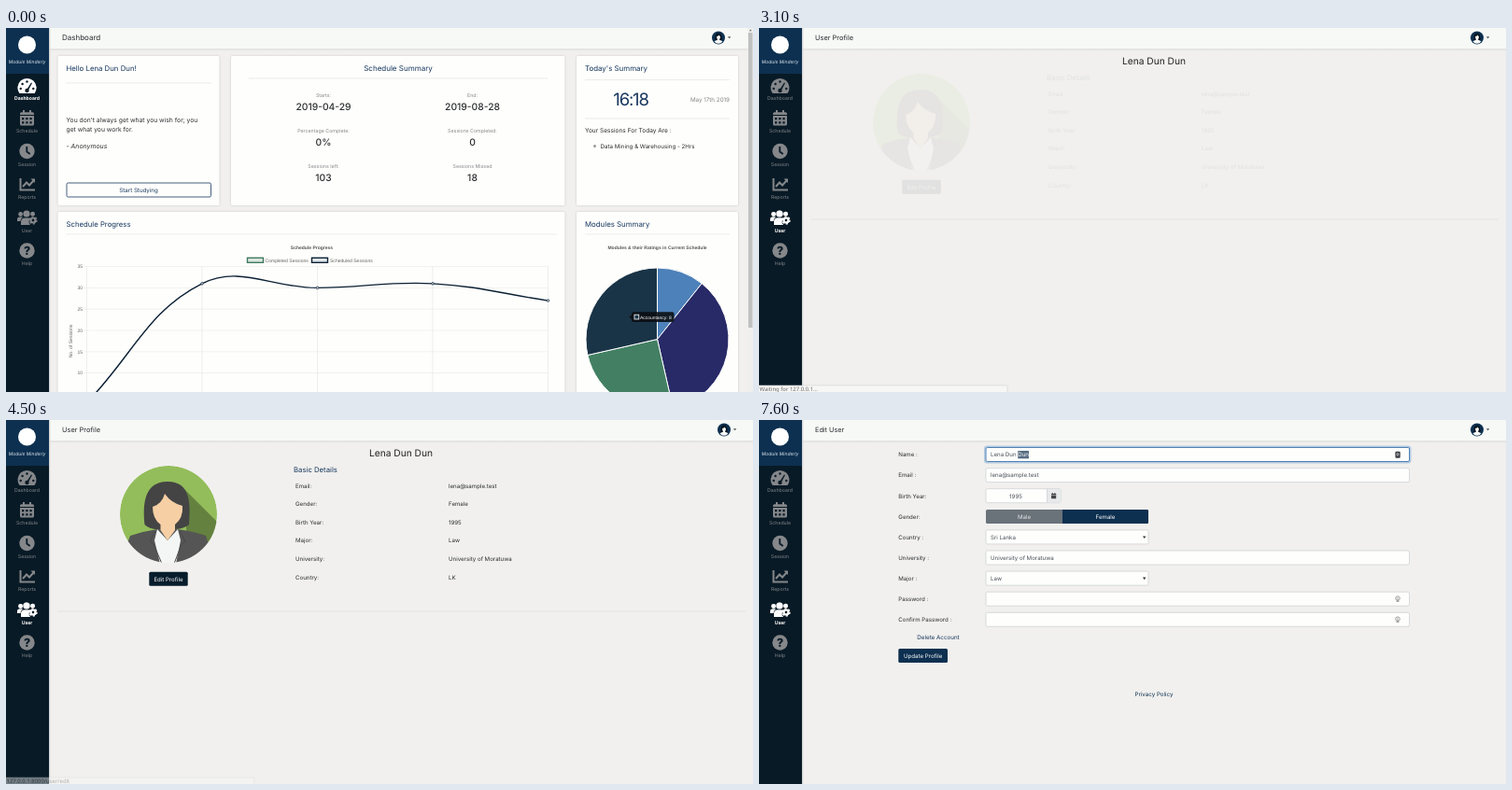
Write an HTML page that moves like this. It is 800 px wide and 390 px high and loops after 8 s.

```html
<!DOCTYPE html>
<html lang="en">
<head>
<meta charset="utf-8">
<title>Study dashboard</title>
<style>
html, body { margin: 0; width: 100%; height: 100%; overflow: hidden; background: #f1f0ee; }
svg { display: block; width: 100%; height: 100%; }
text { font-family: Inter, "Open Sans", sans-serif; text-rendering: geometricPrecision; white-space: pre; }
.chart text { font-family: "Liberation Sans", Arial, sans-serif; }
.status text { font-family: "Noto Sans", "Open Sans", sans-serif; }
.card { fill: #fefefc; filter: drop-shadow(0 .5px 1px rgba(0, 0, 0, .17)); }
.fade { animation: fade 8s infinite; }
.edit-link { animation: edit-link 8s linear infinite; }
.pressed { animation: pressed 8s linear infinite; }
.focus { animation: focus 8s linear infinite; }
@keyframes fade {
  0%, 37.7% { opacity: 0; animation-timing-function: ease; }
  50.2%, 100% { opacity: 1; }
}
@keyframes edit-link {
  0%, 55% { opacity: 0; }
  56.25%, 60% { opacity: .45; }
  63.75%, 69.99% { opacity: .85; }
  70%, 100% { opacity: 0; }
}
@keyframes pressed {
  0%, 59% { opacity: 0; }
  63.75%, 100% { opacity: 1; }
}
@keyframes focus {
  0%, 74% { opacity: 0; }
  76.25%, 100% { opacity: 1; }
}
</style>
</head>
<body>
<script>
const LOOP = 8000;
const NAVY = '#17375e', DARK = '#081a26', BLUE = '#0d3050', INK = '#2b2d30', MUTED = '#85878a';
const USER = 'Lena Dun Dun', EMAIL = 'lena@sample.test';
let keyframes = '', clock = 0;

// Shows content only within the given [from, to] ranges of the loop, in ms.
function during(content, ...ranges) {
  const name = 'show' + clock++;
  const at = (ms, value) => `${ms / LOOP * 100}%{opacity:${value}}`;
  keyframes += `@keyframes ${name}{0%{opacity:0}${ranges.map(([a, b]) => at(a, 1) + at(b, 0)).join('')}}`;
  return `<g style="animation:${name} ${LOOP}ms step-end infinite">${content}</g>`;
}
const text = (x, y, value, size = 6.15, fill = INK, attrs = '') =>
  `<text x="${x}" y="${y}" font-size="${size}" fill="${fill}" ${attrs}>${value.replace('&', '&amp;')}</text>`;
const centered = (x, y, value, size, fill, attrs = '') =>
  text(x, y, value, size, fill, 'text-anchor="middle" ' + attrs);
const rect = (x, y, w, h, fill, attrs = '') =>
  `<rect x="${x}" y="${y}" width="${w}" height="${h}" fill="${fill}" ${attrs}/>`;
const circle = (x, y, r, attrs = '') => `<circle cx="${x}" cy="${y}" r="${r}" ${attrs}/>`;
const path = (d, attrs = '') => `<path d="${d}" ${attrs}/>`;
const rule = (x1, x2, y) => path(`M${x1} ${y}H${x2}`, 'stroke="#e4e4e2" stroke-width=".7"');

// Sidebar
const icons = {
  Dashboard: path('M14.5 70a10 10 0 1 1 16 0z') +
    `<g fill="${DARK}">${[[15.7, 65], [17.6, 60], [22.5, 57.5], [29.3, 65]].map(([x, y]) => circle(x, y, 1.2)).join('')}` +
    circle(22.5, 67, 2.2) + path('M21.8 66.5L27 58.5L28 59L23.8 67z') + '</g>',
  Schedule: path('M18 88h2v2.2h5V88h2v2.2h1.5q1.5 0 1.5 1.5V93H15v-1.3q0-1.5 1.5-1.5H18z') +
    path('M15 94h15v9q0 1.6-1.5 1.6h-12Q15 104.600 15 103z') +
    `<g fill="${DARK}">${[0, 1, 2, 3, 4, 5].map(i => rect(17 + i % 3 * 4.2, 96 + (i > 2) * 4.2, 2.3, 2.3, DARK)).join('')}</g>`,
  Session: circle(22.5, 132, 8.2) + path('M22.300 127v5.500l3.400 2.500', `fill="none" stroke="${DARK}" stroke-width="1.800"`),
  Reports: path('M15.500 161v12.500h15.500', 'fill="none" stroke="currentColor" stroke-width="2"') +
    path('M18 170l4-4.500 3 3 4.500-5', 'fill="none" stroke="currentColor" stroke-width="2"') + path('M26.500 161.500h4.500v4.500z'),
  User: circle(15.6, 199.5, 2.4) + circle(28.6, 199.2, 2.4) + circle(22, 199, 3.6) +
    path('M12 207v-2q0-2.500 2.500-2.500h3.500q-2.500 2-2.500 4.500z') +
    path('M16 211v-3q0-4.500 4-4.500h4q1.500 0 2 1-3 3.500 0 6.500z') +
    circle(29, 206, 2.5, 'fill="none" stroke="currentColor" stroke-width="2.200"') +
    circle(29, 206, 4, 'fill="none" stroke="currentColor" stroke-width="1.200" stroke-dasharray="2.100 2.090"'),
  Help: circle(22.5, 238.5, 8.2) +
    centered(22.5, 243, '?', 12.5, DARK, 'font-weight="800"')
};
const names = Object.keys(icons);
function navItem(name, active) {
  const color = active ? '#fff' : MUTED;
  const label = centered(22.5, 77 + names.indexOf(name) * 35.4, name, active ? 5.1 : 5.2, color, active ? 'font-weight="600"' : '');
  return `<g fill="${color}" color="${color}">${icons[name]}${label}</g>`;
}
const sidebar = rect(0, 0, 46, 390, DARK) + rect(0, 0, 46, 49, BLUE) +
  rect(46, 0, 2.5, 390, 'url(#side)') + circle(22.5, 18, 9.5, 'fill="#fff"') +
  during(
    centered(22.5, 38, 'Module Minderly', 5, '#dde5ec', 'font-style="italic"') +
    names.map(n => navItem(n)).join('') +
    during(navItem('Dashboard', true), [0, 3100]) +
    during(navItem('User', true), [1400, LOOP]),
    [0, 5400], [5500, LOOP]);

// Header
const account = circle(0, 0, 7, `fill="${BLUE}"`) +
  path('M-3.500 3Q-4-5 0-5T3.500 3z', 'fill="#07131d"') +
  path('M-1.900-1.500Q0-2 .800-3 1.500-1.500 2-1.300 2 1.200.900 2L4.500 3.800Q3 6.300 0 6.300T-4.500 3.800L-.900 2Q-2 1-1.900-1.500z', 'fill="#f5f8f6"') +
  path('M9.800-1.200h3.600l-1.800 1.900z', 'fill="#555"');
const header = rect(46, 0, 754, 22.5, '#f6f9f6') + rect(46, 22.5, 754, 2.5, 'url(#under)') +
  during(`<g transform="translate(763 10.500)">${account}</g>`, [0, 3100]) +
  during(`<g transform="translate(769 10.500)">${account}</g>`, [3100, LOOP]);

// Dashboard
const card = (x, y, w, h) => rect(x, y, w, h, '#fefefc', 'rx="1.500" class="card"');
const summary = [
  ['Starts:', '2019-04-29', 'End:', '2019-08-28'],
  ['Percentage Complete:', '0%', 'Sessions Completed:', '0'],
  ['Sessions left:', '103', 'Sessions Missed', '18']
].map((row, i) => row.map((value, j) => {
  const x = j < 2 ? 340 : 499.5, y = 73.5 + i * 38;
  return j % 2 ? centered(x, y + 14, value, 10.3, INK, 'font-weight="500"') : centered(x, y, value, 5.3, MUTED);
}).join('')).join('');

const gridX = [0, 1, 2, 3, 4].map(i => 86.5 + i * 123.5);
const valueY = v => 255.6 + (35 - v) * 4.56;
function lineChart() {
  const pts = [3, 31, 30, 31, 27].map((v, i) => [gridX[i], valueY(v)]);
  const dist = (a, b) => Math.hypot(a[0] - b[0], a[1] - b[1]);
  const handles = pts.map((p, i) => {
    const a = pts[i - 1] || p, b = pts[i + 1] || p, da = dist(a, p), db = dist(p, b);
    const move = k => p.map((v, n) => v + .4 * k / (da + db) * (b[n] - a[n]));
    return [move(-da), move(db)];
  });
  const curve = pts.map((p, i) => i ? `C${handles[i - 1][1]} ${handles[i][0]} ${p}` : `M${p}`).join('');
  const ticks = [35, 30, 25, 20, 15, 10].map(v =>
    path(`M83 ${valueY(v)}H580.500`, 'stroke="#e7e7e5" stroke-width=".6"') +
    text(82, valueY(v) + 1.8, '' + v, 5, '#666', 'text-anchor="end"')).join('');
  return ticks + gridX.map(x => path(`M${x} 255.600V390`, 'stroke="#e3e3e1" stroke-width=".6"')).join('') +
    path(curve, 'fill="none" stroke="#0b2034" stroke-width="1.400"') +
    pts.map(([x, y]) => circle(x, y, 1.3, 'fill="#cfd6dc" stroke="#0b2034" stroke-width=".7"')).join('') +
    centered(327.5, 237, 'Schedule Progress', 5, '#555', 'font-weight="700"') +
    rect(258.5, 246.3, 17, 5, '#dce6e0', 'stroke="#3d7a5f" stroke-width="1.400"') +
    text(277.5, 250.7, 'Completed Sessions', 5.05, '#666') +
    rect(327.5, 246.3, 17, 5, '#dfe4e8', 'stroke="#0b2034" stroke-width="1.400"') +
    text(347, 250.7, 'Scheduled Sessions', 5.05, '#666') +
    centered(0, 0, 'No. of Sessions', 5.1, '#666', 'transform="translate(71 335.500) rotate(-90)"');
}
function pieChart() {
  let sum = 0;
  const rim = n => {
    const a = n / 28 * 2 * Math.PI;
    return `${697.5 + 76.5 * Math.sin(a)} ${333.5 - 76.5 * Math.cos(a)}`;
  };
  const slices = [[3, '#4d81b9'], [10, '#282a67'], [7, '#438063'], [8, '#1a3447']].map(([n, fill]) => {
    const start = rim(sum);
    sum += n;
    return path(`M697.500 333.500L${start}A76.500 76.500 0 0 1 ${rim(sum)}z`, `fill="${fill}" stroke="#fff"`);
  }).join('');
  return slices + centered(697.5, 237, 'Modules & their Ratings in Current Schedule', 5, '#555', 'font-weight="700"') +
    `<g>${rect(670, 304.3, 45.5, 10.7, '#0a0d10', 'rx="2" opacity=".88"')}${path('M670 307.500l-2.500 2.200 2.500 2.200z', 'fill="#0a0d10"')}` +
    rect(673, 307.2, 4.8, 4.8, '#1a3447', 'stroke="#fff" stroke-width=".8"') + text(679, 311.5, 'Accountancy: 8', 4.95, '#fff') + '</g>';
}
const dashboard = text(60, 13, 'Dashboard', 8) +
  card(55.5, 30, 173, 160) + card(241, 30, 357.5, 160) + card(611, 30, 173, 160) +
  card(55.5, 197, 543, 210) + card(611, 197, 173, 210) +
  text(64.5, 45.5, `Hello ${USER}!`, 7.8, NAVY) + rule(64.5, 220, 59) +
  text(64.5, 100.5, "You don't always get what you wish for; you", 6.77) +
  text(64.5, 111, 'get what you work for.', 6.77) +
  text(64.5, 129, '- Anonymous', 6.9, INK, 'font-style="italic"') +
  rect(65, 166, 154.5, 15, '#fefefc', `rx="1.500" stroke="${NAVY}" stroke-width=".8"`) +
  centered(142, 175.7, 'Start Studying', 6.2, NAVY) +
  centered(420, 45.5, 'Schedule Summary', 8, NAVY) + rule(260, 580, 54) + summary +
  text(620, 45.5, "Today's Summary", 7.9, NAVY) + rule(620, 775, 55.5) +
  centered(669, 82.5, '16:18', 18.5, NAVY, 'letter-spacing="-1.200"') +
  text(775, 78.5, 'May 17th 2019', 6.25, MUTED, 'text-anchor="end"') + rule(620, 775, 97) +
  text(620, 112, 'Your Sessions For Today Are :', 6.55) +
  circle(630.5, 126.5, 1.5, 'fill="#999"') + text(636.5, 129, 'Data Mining & Warehousing - 2Hrs', 6.2) +
  text(64.5, 212.5, 'Schedule Progress', 7.75, NAVY) + rule(64.5, 590, 221) +
  text(620, 212.5, 'Modules Summary', 7.85, NAVY) + rule(620, 775, 221) +
  `<g class="chart">${lineChart()}${pieChart()}</g>` +
  rect(794.5, 0, 5.5, 390, '#efefee') + rect(795, 5, 4.5, 316, '#bfc0c0') +
  path('M796 3.200l1.300-1.700 1.300 1.700z', 'fill="#666"');

// Profile
const portrait = `<g clip-path="url(#disc)">${circle(174, 101, 52, 'fill="#93bd5a"')}` +
  path('M191 74L228 111V155H195z', 'fill="#64813f"') +
  path('M148.500 112C146 88 149 66 173 66S198 88 196 112Q190 117 180 117H166Q154 118 148.500 112z', 'fill="#444"') +
  path('M122 154L133 124Q148 119 162 117H184Q203 120 214 124L224 154z', 'fill="#555"') +
  path('M162 117L173 129 184 117 187 129 182 154H165L159 129z', 'fill="#f3f6f5"') +
  path('M157 93Q167 90 170 79 177 89 189 92 190 105 181 112V118L173 129 165.500 118V112Q157 106 157 93z', 'fill="#f6cfa5"') +
  path('M160 119L154 130 158 133 167 154M186 119L192 130 188 133 180 154', 'fill="none" stroke="#484848"') + '</g>';
const details = [['Email:', EMAIL], ['Gender:', 'Female'], ['Birth Year:', '1995'], ['Major:', 'Law'],
  ['University:', 'University of Moratuwa'], ['Country:', 'LK']].map(([label, value], i) =>
  text(310, 72.6 + i * 19.6, label) + text(474, 72.6 + i * 19.6, value)).join('');
const profile = text(60, 13, 'User Profile', 7.4) + centered(423, 39, USER, 10.2, '#222') +
  path('M56 205H792', 'stroke="#dfdfdd" stroke-width=".8"') +
  `<g class="fade">${portrait}${text(308, 56, 'Basic Details', 7.75, NAVY)}${details}` +
  rect(152.3, 161.8, 43.4, 17, '#9aa9b6', 'rx="2.500" class="pressed"') +
  rect(153.3, 162.8, 41.4, 15, '#071d2c', 'rx="1.500"') + centered(174, 172.6, 'Edit Profile', 6.1, '#fff') + '</g>';

// Edit form
const rowY = i => 37 + i * 22.1;
const field = (i, w, attrs = 'stroke="#cfd2d4" stroke-width=".8"') =>
  rect(243, rowY(i) - 7.5, w, 15, '#fefefd', `rx="1.500" ${attrs}`);
const arrow = i => path(`M411 ${rowY(i) - 1}h3.400l-1.700 2.600z`, 'fill="#333"');
const toggle = rect(243, 96, 174, 15, '#6a727a', 'rx="1.500"');
const fields = field(0, 453.5) + field(1, 453.5) + field(2, 80) +
  rect(308.5, rowY(2) - 7.1, 14.1, 14.2, '#e7e9ea') + path(`M308.500 ${rowY(2) - 7.5}v15`, 'stroke="#cfd2d4" stroke-width=".8"') +
  toggle + field(4, 174) + arrow(4) + field(5, 453.5) + field(6, 174) + arrow(6) + field(7, 453.5) + field(8, 453.5);
const keyIcon = y => circle(684, y - .6, 2.3, 'fill="none" stroke="#888" stroke-width=".8"') +
  path(`M684 ${y - 1.6}v4.600M682.500 ${y + 2.6}h3`, 'stroke="#888" stroke-width=".8"');
const values = [USER, EMAIL, '', '', 'Sri Lanka', 'University of Moratuwa', 'Law'];
const form = text(60, 13, 'Edit User', 7.3) +
  ['Name :', 'Email :', 'Birth Year:', 'Gender:', 'Country :', 'University :', 'Major :', 'Password :', 'Confirm Password :']
    .map((label, i) => text(149.3, rowY(i) + 2.3, label)).join('') +
  `<g class="focus">${rect(241.8, 28.3, 455.9, 17.4, 'none', 'rx="2.500" stroke="#b4cae2" stroke-width="1.600"')}` +
  field(0, 453.5, 'stroke="#3f76ad" stroke-width=".9"') + '</g>' +
  values.map((v, i) => v && text(248, rowY(i) + 2.3, v, 6.15, '#495057', i ? '' : 'id="name"')).join('') +
  during('<path id="caret" stroke="#222" stroke-width=".6"/>', [6200, 6700], [7200, 7600]) +
  during(`<rect id="mark" y="33" height="8.300" fill="#566b82"/>${text(0, rowY(0) + 2.3, USER.slice(9), 6.15, '#fff', 'id="marked"')}`, [7600, LOOP]) +
  centered(275, rowY(2) + 2.3, '1995', 6.15, '#495057') +
  rect(313, 79, 5.2, 5.2, '#444', 'rx=".6"') + path('M314.300 78v1.500M316.900 78v1.500', 'stroke="#444"') +
  path('M313 80.600h5.200', 'stroke="#e7e9ea" stroke-width=".5"') +
  path('M325 96H415.500Q417 96 417 97.500V109.500Q417 111 415.500 111H325z', `fill="${BLUE}"`) +
  centered(284, 105.6, 'Male', 6.15, '#e4e6e8') + centered(371, 105.6, 'Female', 6.15, '#fff') +
  centered(192, 235, 'Delete Account', 6.25, NAVY) +
  rect(149.3, 245, 52.7, 15, BLUE, 'rx="1.500"') + centered(175.7, 254.7, 'Update Profile', 6.15, '#fff') +
  centered(423, 296.3, 'Privacy Policy', 6.2, BLUE) +
  during(keyIcon(rowY(7)) + keyIcon(rowY(8)) + keyIcon(rowY(0)), [5800, LOOP]) +
  during(rect(681.5, 33.7, 5.2, 7, '#3b3f44', 'rx="1"') + circle(684, 36.8, 1.2, 'fill="none" stroke="#fff" stroke-width=".6"'), [6700, LOOP]);
const edit = fields + during(rect(149.3, 245, 48.7, 15, BLUE, 'rx="1.500"'), [5400, 5500]) + during(form, [5500, LOOP]);

const status = message => rect(-1, 383, 267, 8, '#f7f7f6', 'rx="1" stroke="#d2d2d0" stroke-width=".6"') +
  text(.5, 389.4, message, 5.95, '#666');

document.body.innerHTML = `<svg viewBox="0 0 800 390" preserveAspectRatio="none">
  <defs>
    <clipPath id="disc">${circle(174, 101, 52)}</clipPath>
    <linearGradient id="side"><stop stop-color="#bfc2c3"/><stop offset="1" stop-color="#f1f0ee" stop-opacity="0"/></linearGradient>
    <linearGradient id="under" x2="0" y2="1"><stop stop-color="#d3d5d3"/><stop offset="1" stop-color="#f1f0ee" stop-opacity="0"/></linearGradient>
  </defs>
  ${rect(0, 0, 800, 390, '#f1f0ee')}${header}
  ${during(dashboard, [0, 3100])}${during(profile, [3100, 5400])}${during(edit, [5400, LOOP])}
  ${sidebar}
  <g class="status">
    ${during(status('127.0.0.1:8000/user'), [1700, 2400])}
    ${during(status('Waiting for 127.0.0.1...'), [2400, 4000])}
    <g class="edit-link">${status('127.0.0.1:8000/user/edit')}</g>
  </g>
</svg><style>${keyframes}</style>`;

// Place the caret and the selection on the last word of the name.
const find = id => document.getElementById(id);
const from = find('name').getStartPositionOfChar(9).x, to = find('name').getEndPositionOfChar(11).x;
find('caret').setAttribute('d', `M${to + .3} 33V41.300`);
find('mark').setAttribute('x', from);
find('mark').setAttribute('width', to - from);
find('marked').setAttribute('x', from);
</script>
</body>
</html>
```
